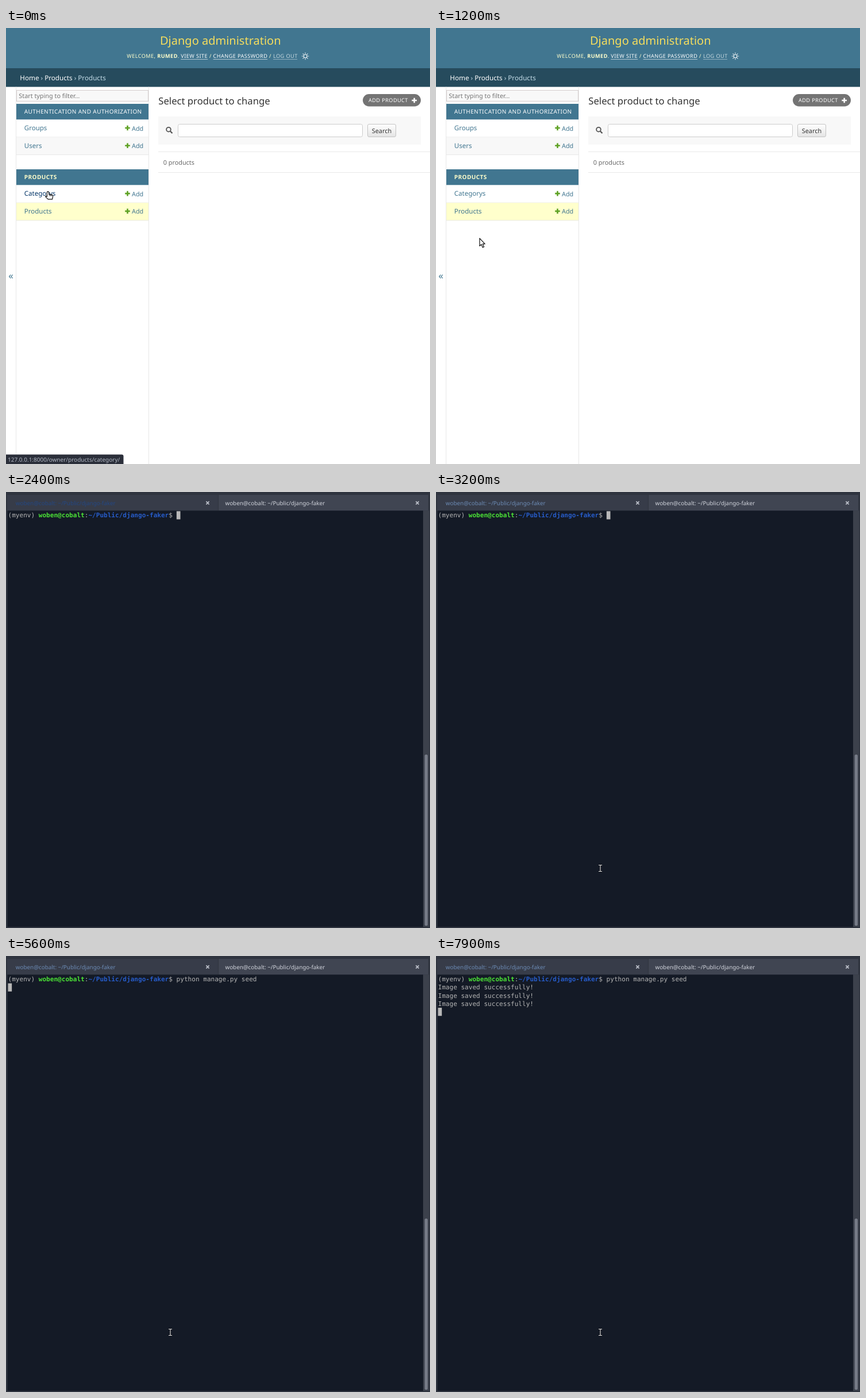
These frames come from a looping animation (738 px wide and 759 px high, 8000 ms). An HTML page:

```html
<!DOCTYPE html>
<html lang="en">
<head>
<meta charset="utf-8">
<title>Product list and terminal</title>
<style>
html, body { margin: 0; width: 100%; height: 100%; overflow: hidden; }
svg { display: block; font-family: "Noto Sans", "Open Sans", sans-serif; text-rendering: geometricPrecision; }
text { white-space: pre; }
.mono { font: 11.07px "DejaVu Sans Mono", monospace; }
.caps { letter-spacing: .417px; }
</style>
</head>
<body>
<svg id="stage" width="738" height="759" viewBox="0 0 738 759"></svg>
<script>
const LOOP = 8000;
const stage = document.getElementById('stage');
const USER = 'woben@cobalt', PATH = '~/Public/django-faker';

const rect = (x, y, w, h, fill, more = '') =>
  `<rect x="${x}" y="${y}" width="${w}" height="${h}" fill="${fill}" ${more}/>`;
const text = (x, y, size, fill, str, more = '') =>
  `<text x="${x}" y="${y}" font-size="${size}" fill="${fill}" ${more}>${str}</text>`;
const path = (d, stroke, width, more = 'fill="none"') =>
  `<path d="${d}" stroke="${stroke}" stroke-width="${width}" ${more}/>`;
const plus = (x, y, color) => path(`M${x - 4.3} ${y}h8.6M${x} ${y - 4.3}v8.6`, color, 2.6);
const clamp = v => Math.max(0, Math.min(1, v));
const lerp = (a, b, k) => a + (b - a) * k;
const easeOut = k => 1 - (1 - k) ** 2;

// ---- product pages ----
function header(current) {
  const link = (x, w, str, color = '#fff') =>
    text(x, 52.4, 9.17, color, str, 'class="caps"') + rect(x, 54, w, 1, color, 'opacity=".6"');
  const slash = x => text(x, 52.4, 9.17, '#ffc', '/');
  let rays = '';
  for (let i = 0; i < 8; i++) {
    const c = Math.cos(i * Math.PI / 4), s = Math.sin(i * Math.PI / 4);
    rays += `M${521 + 4.4 * c} ${49 + 4.4 * s}L${521 + 6.2 * c} ${49 + 6.2 * s}`;
  }
  return rect(0, 0, 738, 70, '#417690') + rect(0, 70, 738, 32.5, '#264b5d')
    + text(268, 29, 20, '#f5dd5d', 'Django administration', 'font-weight="300"')
    + text(210.3, 52.4, 9.17, '#ffc', 'WELCOME, <tspan font-weight="700">RUMED</tspan>.', 'class="caps"')
    + link(304.3, 47, 'VIEW SITE') + slash(354)
    + link(360.6, 94.5, 'CHANGE PASSWORD') + slash(458)
    + link(465, 42, 'LOG OUT', '#c6d8df')
    + '<circle cx="521" cy="49" r="3" fill="none" stroke="#fff" stroke-width="1.1"/>'
    + path(rays, '#fff', 1.1)
    + text(24.3, 90.8, 11.67, '#c4dce8',
      `<tspan fill="#fff">Home</tspan> › <tspan fill="#fff">Products</tspan> › ${current}`);
}

function sidebar(selected, hover, clicked) {
  const caption = (y, str, more) => rect(18, y, 230, 27.5, '#417690')
    + text(31.8, y + 17.3, 10, more ? '#ffc' : '#fff', str, 'class="caps" ' + (more || ''));
  const row = (y, name, shade) => rect(18, y, 230, 30.8, name === selected ? '#ffc' : shade)
    + rect(18, y + 30, 230, 1, '#e8e8e8')
    + text(31.8, y + 18.8, 11.5, name === hover ? '#036' : '#417690', name,
      'font-weight="500"' + (name === hover && clicked ? ' text-decoration="underline"' : ''))
    + plus(211.5, y + 14.5, '#5fa225') + text(219, y + 19, 10.83, '#417690', 'Add');
  return rect(17, 102.5, 1, 657, '#e8e8e8') + rect(248, 102.5, 1, 657, '#e8e8e8')
    + rect(18.5, 108.5, 229, 19, '#f8f8f8', 'stroke="#d4cccc"')
    + text(22.3, 122, 10.83, '#757575', 'Start typing to filter…')
    + caption(132, 'AUTHENTICATION AND AUTHORIZATION')
    + row(159.5, 'Groups', '#fff') + row(190.2, 'Users', '#f8f8f8')
    + caption(246, 'PRODUCTS', 'font-weight="700"')
    + row(273.6, 'Categorys', '#fff') + row(304.4, 'Products', '#f8f8f8')
    + text(8.4, 437.3, 16.67, '#417690', '«', 'text-anchor="middle"');
}

function content(kind) {
  const isProduct = kind === 'product';
  const left = isProduct ? 621 : 617.5, top = isProduct ? 215 : 154;
  const search = rect(265, 154, 457, 49, '#f8f8f8')
    + '<circle cx="283" cy="176.7" r="3.8" fill="none" stroke="#555" stroke-width="1.9"/>'
    + path('M285.8 179.5L289.5 183.2', '#555', 2.3)
    + rect(299.5, 167.5, 321, 22, '#fff', 'rx="3" stroke="#ccc"')
    + '<linearGradient id="g" x2="0" y2="1"><stop stop-color="#fff"/><stop offset="1" stop-color="#e4e4e4"/></linearGradient>'
    + rect(629.5, 167.5, 49, 22, 'url(#g)', 'rx="2.5" stroke="#c4c4c4"')
    + text(636.8, 182.8, 10.83, '#333', 'Search');
  return text(265.3, 132.5, 16.67, '#333', `Select ${kind} to change`, 'font-weight="300"')
    + rect(left, 115, 722 - left, 21.5, '#747474', 'rx="10.75"')
    + text(left + 10, 129.3, 9.17, '#fff', `ADD ${kind.toUpperCase()}`, 'class="caps"')
    + plus(710.7, 126, '#fff')
    + (isProduct ? search : '')
    + rect(265, top, 473, 1, '#e8e8e8') + rect(265, top + 36, 473, 1, '#e8e8e8')
    + text(273.8, top + 22.9, 10.83, '#666', `0 ${kind}s`);
}

function status(name) {
  const w = name === 'category' ? 204.5 : 200.5;
  return `<path d="M0 742.5H${w - 3}q3 0 3 3V759H0z" fill="#2b2f3a"/>`
    + text(3, 754.6, 10, '#b4bac6', `127.0.0.1:8000/owner/products/${name}/`);
}

function pointer(x, y, hand) {
  const d = hand
    ? 'M-1.6 8.4V.8Q0-1.4 1.6.8V4.4L7 5.4Q8.8 6 8.6 8.2L7.6 13.2H.2L-4.4 8.6Q-4.2 6.6-1.6 8.4zM3.4 5.2v2.4M5.7 5.6v2.2'
    : 'M0 0V13.4L3 10.7L5.2 16L7.6 15L5.3 9.9H9.2z';
  return `<g transform="translate(${x} ${y})">`
    + path(d, '#111', 1.2, 'fill="#fff" stroke-linejoin="round"') + '</g>';
}

function browser(t) {
  const kind = t >= 300 && t < 900 ? 'category' : 'product';
  const current = kind === 'product' ? 'Products' : 'Categorys';
  const hover = t < 600 ? 'Categorys' : t < 1200 ? 'Products' : '';
  const clicked = t === 200 || t === 800;
  const loading = clicked || t === 300 || t === 900;
  const down = clamp((t - 400) / 300), away = clamp((t - 1000) / 900) ** 1.5;
  const x = lerp(lerp(73, 72, down), 110, away);
  const y = lerp(lerp(285, 319.5, down), 764, away);
  return rect(0, 0, 738, 759, '#fff')
    + header(current) + sidebar(current, hover, clicked) + content(kind)
    + (hover ? status(hover === 'Products' ? 'product' : 'category') : '')
    + pointer(x, y, hover && !loading);
}

// ---- terminal ----
function terminal(t) {
  const CELL = 6.667, LINE = 14.17;
  const typed = t >= 4600 ? 'python manage.py seed' : '';
  const saved = [6800, 7400, 7900].filter(at => t >= at).length;
  const row = t >= 5600 ? saved + 1 : 0;
  const col = row ? 0 : 44 + typed.length;
  const fade = clamp((t - 2800) / 400);
  const mix = (a, b) => Math.round(lerp(a, b, fade));
  const dim = `rgb(${mix(36, 108)},${mix(72, 139)},${mix(132, 181)})`;
  const title = `${USER}: ${PATH}`;
  const close = x => path(`M${x - 2.6} 16.4l5.2 5.2m0-5.2l-5.2 5.2`, '#bcc0ca', 1.7);
  const line = (i, str) => text(3.5, 44.2 + i * LINE, 11.07, '#b4b4b4', str, 'class="mono"');

  let out = rect(0, 0, 738, 759, '#2f343f')
    + rect(2, 5, 367, 27.5, '#373c49') + rect(370, 5, 365, 27.5, '#404552')
    + text(16.8, 22.6, 9.85, dim, title) + text(381.4, 22.6, 9.85, '#d0d4dc', title)
    + close(351) + close(716)
    + rect(2.5, 32.5, 723.5, 724.5, '#141a26')
    + rect(726, 32.5, 10.5, 724.5, '#3c414c')
    + rect(728.7, 457, 5.3, 298, '#767b87', 'rx="2.6"')
    + line(0, `(myenv) <tspan font-weight="700" fill="#4be336">${USER}</tspan>:`
      + `<tspan font-weight="700" fill="#275cc9">${PATH}</tspan>$ ${typed}`);
  for (let i = 1; i <= saved; i++) out += line(i, 'Image saved successfully!');
  out += rect(3.5 + col * CELL, 33.4 + row * LINE, CELL, LINE, '#b8b8b8');

  if (t >= 2900) {
    const k = easeOut(clamp((t - 2800) / 400));
    const x = lerp(262, 286, k), y = lerp(764, 655, k);
    const beam = `M${x - 3} ${y - 5.5}h6M${x} ${y - 5.5}v11M${x - 3} ${y + 5.5}h6`;
    out += path(beam, '#0a0d13', 2.4) + path(beam, '#e8e8e8', 1.1);
  }
  return out;
}

let shown = -1;
function frame(now) {
  // The picture advances in tenths of a second.
  const t = Math.floor(now % LOOP / 100) * 100;
  if (t !== shown) {
    shown = t;
    stage.innerHTML = t < 2400 ? browser(t) : terminal(t);
  }
  requestAnimationFrame(frame);
}
frame(0);
</script>
</body>
</html>
```
